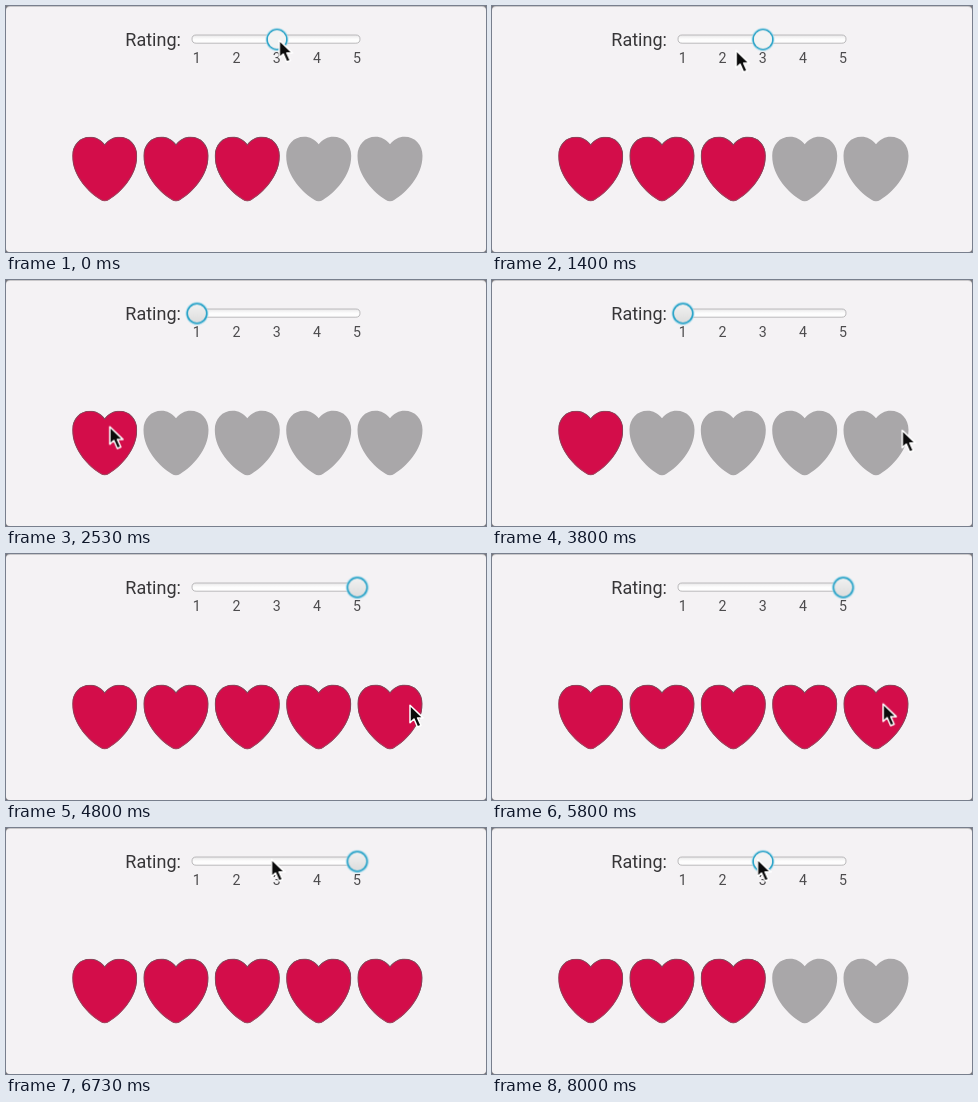
Write an HTML page that moves like this. It is 480 px wide and 246 px high and loops after 8070 ms.

```html
<!DOCTYPE html>
<html lang="en">
<head>
<meta charset="utf-8">
<title>Heart rating</title>
<style>
  html, body { margin: 0; width: 100%; height: 100%; overflow: hidden; background: #77757a; }
  svg { display: block; width: 480px; height: 246px; }
  text { font-family: Roboto, Inter, sans-serif; fill: #363537; }
  .label { font-size: 18px; }
  .ticks { font-size: 14.2px; text-anchor: middle; }
  .ticks text { fill: #4c4b4d; }

  .thumb, .hover, .mid, .high { animation: 8.07s step-end infinite; }
  .thumb { animation-name: slide; }
  .hover { animation-name: hover; }
  .mid { animation-name: mid; }
  .high { animation-name: high; }
  .cursor { animation: move 8.07s linear infinite; }

  @keyframes slide {
    0%, 90.087%, 100% { transform: translate(271px, 33.5px); }
    26.394% { transform: translate(191px, 33.5px); }
    57.001% { transform: translate(351.3px, 33.5px); }
  }
  @keyframes hover {
    0%, 90.087%, 100% { opacity: 1; }
    18.2% { opacity: 0; }
  }
  @keyframes mid {
    0%, 57.001%, 100% { opacity: 1; }
    26.394% { opacity: 0; }
  }
  @keyframes high {
    0%, 90.087%, 100% { opacity: 0; }
    57.001% { opacity: 1; }
  }
  @keyframes move {
    0%, 14.87% { transform: translate(272.3px, 33px); animation-timing-function: ease-in; }
    17.35% { transform: translate(243.3px, 43px); animation-timing-function: cubic-bezier(.3, .35, .5, 1); }
    25.65%, 39.65% { transform: translate(102.8px, 145.5px); animation-timing-function: cubic-bezier(.45, 0, .4, 1); }
    47.09% { transform: translate(409.3px, 149px); animation-timing-function: ease-in-out; }
    49.57%, 68.53% { transform: translate(403px, 150px); animation-timing-function: ease-in; }
    71.87% { transform: translate(390.3px, 148.8px); animation-timing-function: cubic-bezier(.35, .25, .4, 1); }
    79.31%, 100% { transform: translate(264.5px, 30px); }
  }
</style>
</head>
<body>
<svg viewBox="0 0 480 246">
  <defs>
    <path id="heart" d="M32.5 7.6C28.5 2.5 23.5 0 18 0C7.5 0 0 8 0 19C0 40 17 56 28 63Q32.5 66 37 63C48 56 65 40 65 19C65 8 57.5 0 47 0C41.5 0 36.5 2.5 32.5 7.6Z"/>
    <clipPath id="inside"><use href="#heart"/></clipPath>
    <filter id="soft"><feGaussianBlur stdDeviation=".6"/></filter>
    <linearGradient id="rim" x2="0" y2="1">
      <stop offset="0" stop-color="#77545f"/>
      <stop offset=".5" stop-color="#8c3f57"/>
      <stop offset="1" stop-color="#a04a62"/>
    </linearGradient>
    <linearGradient id="track" x2="0" y2="1">
      <stop offset="0" stop-color="#e8e7e8"/>
      <stop offset=".5" stop-color="#fdfdfd"/>
    </linearGradient>
    <linearGradient id="knob" x2="0" y2="1">
      <stop offset="0" stop-color="#f2f2f2"/>
      <stop offset="1" stop-color="#dcdcdc"/>
    </linearGradient>
    <g id="red">
      <g clip-path="url(#inside)">
        <use href="#heart" fill="#d30d4a"/>
        <use href="#heart" fill="none" stroke="url(#rim)" stroke-width="1.8" filter="url(#soft)"/>
      </g>
    </g>
  </defs>

  <rect width="480" height="246" rx="4" fill="#c9c8ca"/>
  <rect y="1" width="480" height="245" rx="4" fill="#f4f2f4"/>

  <text class="label" x="119.3" y="40">Rating:</text>
  <g class="ticks">
    <text x="190.7" y="57.4">1</text>
    <text x="230.5" y="57.4">2</text>
    <text x="270.7" y="57.4">3</text>
    <text x="311" y="57.4">4</text>
    <text x="351" y="57.4">5</text>
  </g>

  <rect x="186" y="29" width="168" height="8.2" rx="4.1" fill="url(#track)" stroke="#bab9bb"/>
  <g class="thumb">
    <circle r="11.6" fill="#a9dcec" opacity=".65"/>
    <circle r="9.8" fill="url(#knob)" stroke="#2fa5c9" stroke-width="1.7"/>
    <circle class="hover" r="9" fill="#f3f3f3"/>
  </g>

  <g fill="#a9a7a9">
    <use href="#heart" x="137.5" y="130.7"/>
    <use href="#heart" x="208.8" y="130.7"/>
    <use href="#heart" x="280.2" y="130.7"/>
    <use href="#heart" x="351.5" y="130.7"/>
  </g>
  <use href="#red" x="66.2" y="130.7"/>
  <g class="mid">
    <use href="#red" x="137.5" y="130.7"/>
    <use href="#red" x="208.8" y="130.7"/>
  </g>
  <g class="high">
    <use href="#red" x="280.2" y="130.7"/>
    <use href="#red" x="351.5" y="130.7"/>
  </g>

  <path class="cursor" d="M1 1.3V18.8L5 15L8.5 23L12 21.5L8.6 13.9H14.1Z"
    fill="#0b0b0b" stroke="#fff" stroke-width="1.5" stroke-linejoin="round"/>
</svg>
</body>
</html>
```
